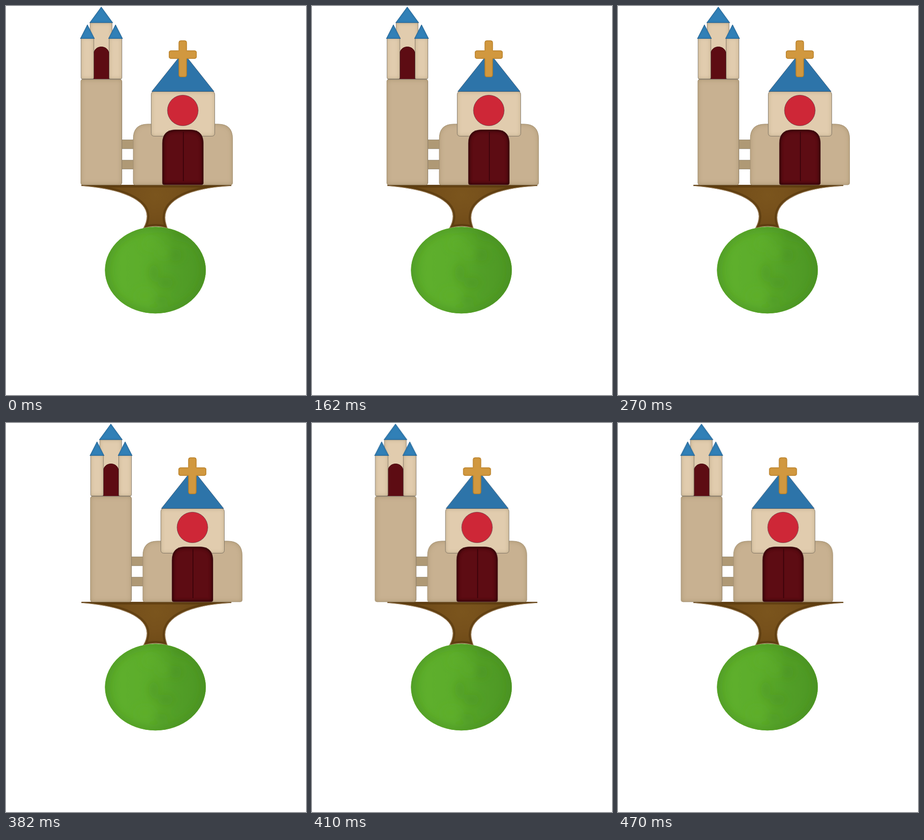
An HTML page for the animation above (0.51 s loop, 656x853 px).

```html
<!DOCTYPE html>
<html lang="en">
<head>
<meta charset="utf-8">
<title>Church on a tree</title>
<style>
  html, body { margin: 0; width: 100%; height: 100%; overflow: hidden; background: #fff; }
  svg { display: block; width: 656px; height: 853px; }
  .church { animation: rattle 510ms step-end infinite; }
  @keyframes rattle {
    0% { transform: translateX(0); }
    52.941% { transform: translateX(11px); }
    66.667% { transform: translateX(21px); }
    80.392% { transform: translateX(-25.7px); }
  }
  .stone { fill: #c8b191; stroke: #a3937b; filter: url(#stoneEdge); }
  .plaster { fill: #e1ccae; filter: url(#plasterEdge); }
  .line { fill: none; stroke: #5d5750; stroke-width: .7; }
  .slate { fill: #3180b7; stroke: #2b5f86; stroke-width: .7; filter: url(#slateEdge); }
  .wood { fill: #5d0c13; filter: url(#woodEdge); }
  .beam { fill: #af9975; stroke: #77684f; stroke-width: .7; }
</style>
</head>
<body>
<svg viewBox="0 0 656 853">
  <defs>
    <!-- Inner shading: blur the inverse of the shape, keep the part inside it. -->
    <filter id="stoneEdge" x="-10%" y="-10%" width="120%" height="120%" color-interpolation-filters="sRGB">
      <feFlood flood-color="#a8936f"/>
      <feComposite operator="out" in2="SourceAlpha"/>
      <feGaussianBlur stdDeviation="5.5"/>
      <feComposite operator="in" in2="SourceAlpha" result="edge"/>
      <feMerge><feMergeNode in="SourceGraphic"/><feMergeNode in="edge"/></feMerge>
    </filter>
    <filter id="plasterEdge" x="-20%" y="-20%" width="140%" height="140%" color-interpolation-filters="sRGB">
      <feFlood flood-color="#bca885"/>
      <feComposite operator="out" in2="SourceAlpha"/>
      <feGaussianBlur stdDeviation="4"/>
      <feComposite operator="in" in2="SourceAlpha" result="edge"/>
      <feMerge><feMergeNode in="SourceGraphic"/><feMergeNode in="edge"/></feMerge>
    </filter>
    <filter id="woodEdge" x="-20%" y="-20%" width="140%" height="140%" color-interpolation-filters="sRGB">
      <feFlood flood-color="#2c0005"/>
      <feComposite operator="out" in2="SourceAlpha"/>
      <feGaussianBlur stdDeviation="4.5"/>
      <feComposite operator="in" in2="SourceAlpha" result="edge"/>
      <feMerge><feMergeNode in="SourceGraphic"/><feMergeNode in="edge"/><feMergeNode in="edge"/></feMerge>
    </filter>
    <filter id="slateEdge" x="-20%" y="-20%" width="140%" height="140%" color-interpolation-filters="sRGB">
      <feFlood flood-color="#246496"/>
      <feComposite operator="out" in2="SourceAlpha"/>
      <feGaussianBlur stdDeviation="2"/>
      <feComposite operator="in" in2="SourceAlpha" result="edge"/>
      <feMerge><feMergeNode in="SourceGraphic"/><feMergeNode in="edge"/></feMerge>
    </filter>
    <filter id="goldEdge" x="-20%" y="-20%" width="140%" height="140%" color-interpolation-filters="sRGB">
      <feFlood flood-color="#a87018"/>
      <feComposite operator="out" in2="SourceAlpha"/>
      <feGaussianBlur stdDeviation="1.8"/>
      <feComposite operator="in" in2="SourceAlpha" result="edge"/>
      <feMerge><feMergeNode in="SourceGraphic"/><feMergeNode in="edge"/></feMerge>
    </filter>
    <filter id="soft" x="-60%" y="-60%" width="220%" height="220%"><feGaussianBlur stdDeviation="9"/></filter>
    <linearGradient id="leaves">
      <stop offset="0" stop-color="#58a82a"/>
      <stop offset=".18" stop-color="#5eaf2c"/>
      <stop offset=".42" stop-color="#5cad2b"/>
      <stop offset=".68" stop-color="#529f27"/>
      <stop offset="1" stop-color="#4c9523"/>
    </linearGradient>
    <radialGradient id="bark" gradientUnits="userSpaceOnUse" cx="328" cy="415" r="150" gradientTransform="translate(328 415) scale(1 .8) translate(-328 -415)">
      <stop offset="0" stop-color="#7b551d"/>
      <stop offset=".35" stop-color="#76501b"/>
      <stop offset="1" stop-color="#644311"/>
    </radialGradient>
    <clipPath id="crown"><ellipse cx="326.7" cy="579.3" rx="110.3" ry="95"/></clipPath>
    <clipPath id="trunkClip"><use href="#trunk"/></clipPath>
    <path id="trunk" d="M165.5 393H492V394C400 399 347.5 425 347.5 464C347.5 472 350 480 352.5 487Q328 479 301 487C306 478 308.5 470 308.5 461C308 425 255 401 165.5 394Z"/>
    <rect id="block" x="317.5" y="187.5" width="139" height="98" rx="6"/>
    <path id="door" d="M342 388V301Q342 271.5 371 271.5H402Q431.5 271.5 431.5 301V388Q431.5 392 427.5 392H346Q342 392 342 388Z"/>
    <rect id="turret" x="164" y="69" width="28" height="91" rx="3"/>
    <path id="cap" d="M178 41L193.5 71.5H162.5Z"/>
  </defs>

  <g>
    <use href="#trunk" fill="url(#bark)"/>
    <g clip-path="url(#trunkClip)" fill="none">
      <use href="#trunk" stroke="#4c300b" stroke-width="10" opacity=".45" filter="url(#goldBlur)"/>
    </g>
    <use href="#trunk" fill="none" stroke="#6d4b20" stroke-width="1.6"/>
    <path d="M165.5 394C255 401 308 425 308.5 461C308.5 470 306 478 301 487Q328 479 352.5 487C350 480 347.5 472 347.5 464C347.5 425 400 399 492 394" fill="none" stroke="#c5ad8c" stroke-width=".7"/>
    <path d="M165.5 393.2H492" stroke="#5c3c12" stroke-width="1.4"/>
  </g>

  <g clip-path="url(#crown)">
    <rect x="210" y="480" width="235" height="200" fill="url(#leaves)"/>
    <g filter="url(#soft)">
      <g fill="#468c20" opacity=".38">
        <ellipse cx="371" cy="546" rx="13" ry="14"/>
        <ellipse cx="349" cy="607" rx="17" ry="12"/>
        <ellipse cx="323" cy="585" rx="10" ry="20"/>
        <ellipse cx="380" cy="505" rx="20" ry="8"/>
        <ellipse cx="341" cy="646" rx="15" ry="9"/>
      </g>
      <g fill="#60b02d" opacity=".55">
        <ellipse cx="343" cy="541" rx="12" ry="13"/>
        <ellipse cx="319" cy="522" rx="20" ry="10"/>
        <ellipse cx="304" cy="635" rx="20" ry="13"/>
      </g>
      <ellipse cx="326.7" cy="579.3" rx="111" ry="96" fill="none" stroke="#438a1f" stroke-width="13" opacity=".6"/>
    </g>
    <ellipse cx="326.7" cy="579.3" rx="110" ry="94.7" fill="none" stroke="#63ac35" opacity=".7"/>
  </g>

  <g class="church">
    <rect class="beam" x="253" y="293.5" width="26" height="19.5"/>
    <rect class="beam" x="253" y="338" width="26" height="19.5"/>

    <rect class="plaster" x="184" y="36.5" width="48" height="123"/>
    <rect class="line" x="184" y="36.5" width="48" height="123"/>
    <path class="wood" d="M191.5 160V106C191.5 84 225.5 84 225.5 106V160Z" style="filter:none"/>
    <path d="M192 160V106C192 84 225 84 225 106V160" fill="none" stroke="#43060c"/>
    <g id="leftTurret">
      <use href="#turret" class="plaster"/>
      <use href="#turret" class="line"/>
      <use href="#cap" class="slate"/>
    </g>
    <use href="#leftTurret" x="61.5"/>
    <path class="slate" d="M208.3 2L233.5 36.7H183Z"/>
    <rect class="stone" x="163.7" y="161" width="89.6" height="231" rx="4"/>
    <path d="M166 160.7H251" stroke="#6c6256" stroke-width=".8"/>
    <path d="M253.4 165V389" stroke="#7d715f" stroke-width=".6"/>

    <path class="stone" d="M278.3 388V291Q278.3 259 310 259H464Q495.4 259 495.4 291V388Q495.4 392 491.4 392H282.3Q278.3 392 278.3 388Z"/>
    <use href="#block" class="plaster"/>
    <use href="#block" class="line"/>
    <path d="M387 101.5L455 187.5H318.7Z" fill="#2d74a9" stroke="#334f69" stroke-width=".8"/>
    <circle cx="386.6" cy="229" r="33.6" fill="#ce2737" stroke="#5d3440" stroke-width=".8"/>

    <use href="#door" class="wood"/>
    <use href="#door" fill="none" stroke="#4a2024" stroke-width=".8"/>
    <path d="M387.8 276V384" stroke="#38030a" stroke-width="1.8"/>

    <path d="M382 76H391Q395 76 395 80V98H412Q416.5 98 416.5 102V111Q416.5 115.2 412 115.2H395V151Q395 155.5 391 155.5H382Q378 155.5 378 151V115.2H361Q356.5 115.2 356.5 111V102Q356.5 98 361 98H378V80Q378 76 382 76Z" fill="#d1983f" stroke="#bd842d" filter="url(#goldEdge)"/>
  </g>
</svg>
</body>
</html>
```
